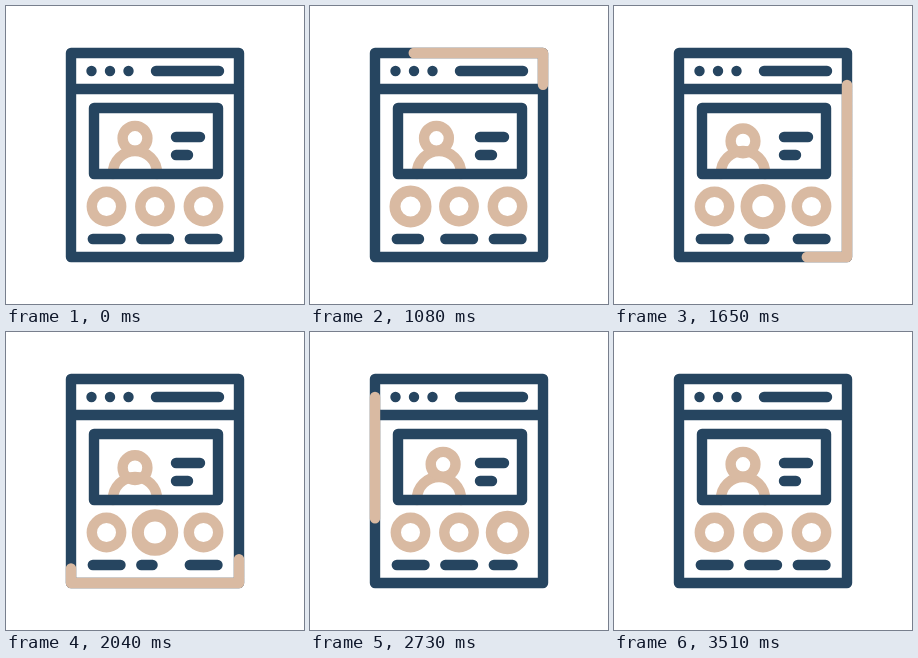
Recreate the animation shown at these times as an HTML page. Size 298 px wide and 298 px high, loop 3.6 s.

```html
<!DOCTYPE html>
<html lang="en">
<head>
<meta charset="utf-8">
<title>Profile page icon</title>
<style>
  html, body { margin: 0; width: 100%; height: 100%; overflow: hidden; background: #fff; }
  svg { display: block; width: 100vw; height: 100vh; }
  path, circle { fill: none; stroke: #264560; stroke-width: 10.4; stroke-linecap: round; stroke-linejoin: round; }
  .tan { stroke: #d9baa2; }
</style>
</head>
<body>
<svg viewBox="0 0 298 298">
  <path class="tan" d="M107 168V167A22 22 0 0 1 151 167V168" stroke-linecap="butt"/>
  <circle class="tan" id="head" cx="129" cy="132.3" r="12.4"/>
  <path d="M65 47H233V251H65ZM65 83H233M88 102H212V168H88Z"/>
  <path d="M85.5 65h.01M104 65h.01M122.5 65h.01M150 65H213M170 131H194M170 149H182"/>
  <g id="items"></g>
  <path class="tan" id="trail" d="M65 47H233V251H65V47"/>
</svg>
<script>
const LOOP = 3600, STEP = 30, PERIMETER = 744;
const head = document.getElementById('head');
const trail = document.getElementById('trail');
const items = document.getElementById('items');

// Each item swells while the head turns towards it.
const pulses = [
  { x: 100.5, start: 90, peak: 690, end: 1290, look: [-9, 0] },
  { x: 149, start: 1290, peak: 1890, end: 2490, look: [0, 4] },
  { x: 197.5, start: 2490, peak: 3000, end: 3510, look: [9, 0] }
];

function add(tag, className) {
  const node = document.createElementNS('http://www.w3.org/2000/svg', tag);
  node.setAttribute('class', className);
  return items.appendChild(node);
}

for (const p of pulses) {
  p.ring = add('circle', 'tan');
  p.ring.setAttribute('r', 14.7);
  p.bar = add('path', '');
}

function ease(t, from, to) {
  const x = Math.min(1, Math.max(0, (t - from) / (to - from)));
  return x * x * (3 - 2 * x);
}

function draw(t) {
  let dx = 0, dy = 0;
  for (const { x, start, peak, end, look, ring, bar } of pulses) {
    const k = ease(t, start, peak) - ease(t, peak, end);
    ring.setAttribute('transform', `translate(${x} 200.5) scale(${1 + 0.2 * k})`);
    bar.setAttribute('d', `M${x - 13.7} 233H${x + 14 - 19.5 * k}`);
    dx += look[0] * k;
    dy += look[1] * k;
  }
  head.setAttribute('transform', `translate(${dx} ${dy})`);

  const front = PERIMETER * ease(t, 90, 3000);
  const back = PERIMETER * ease(t, 690, 3510);
  trail.style.display = front > back ? '' : 'none';
  trail.style.strokeDasharray = `${front - back} 2000`;
  trail.style.strokeDashoffset = -back;
}

function tick() {
  const t = performance.now() % LOOP;
  draw(Math.floor(t / STEP) * STEP);
  requestAnimationFrame(tick);
}
tick();
</script>
</body>
</html>
```
